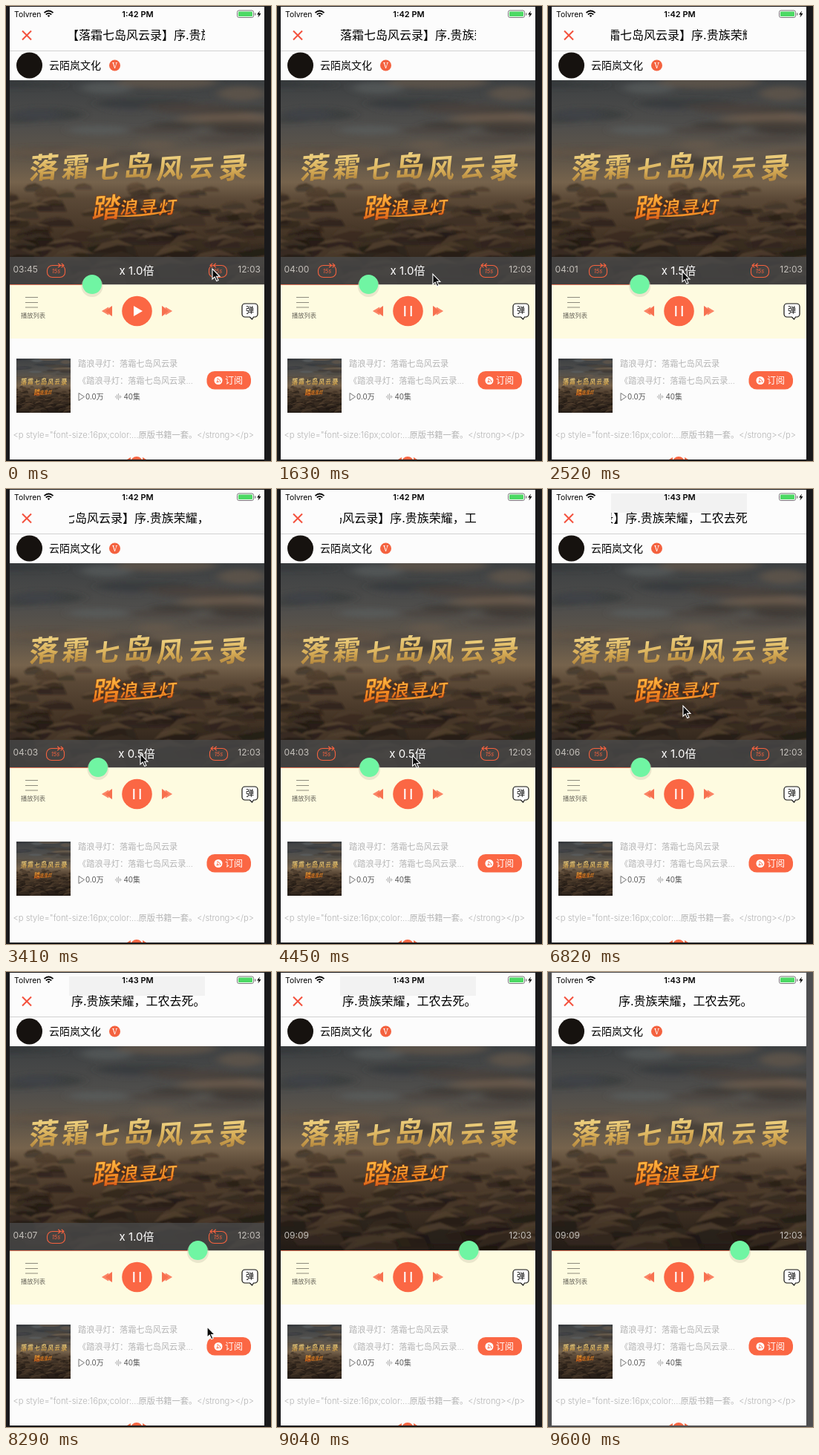
Recreate the animation shown at these times as an HTML page. Size 357 px wide and 613 px high, loop 9700 ms.

```html
<!DOCTYPE html>
<html lang="zh-CN">
<head>
<meta charset="utf-8">
<title>Audio player</title>
<style>
html, body { margin: 0; width: 100%; height: 100%; overflow: hidden; background: #19191b; }
svg { display: block; }
#stage { width: 100%; height: 100%; }
text { font-family: Inter, "Noto Sans CJK SC", "Noto Sans CJK", sans-serif; white-space: pre; }
.mid { text-anchor: middle; }
.end { text-anchor: end; }
.gray { fill: #b4b4b4; font-weight: 300; }
.line { fill: none; stroke: #f4623f; stroke-width: 1.1; stroke-linecap: round; stroke-linejoin: round; }
.tiny { font-size: 7.5px; font-style: italic; fill: #f4623f; text-anchor: middle; }
.brush { font-weight: 600; text-anchor: middle; }
</style>
</head>
<body>
<svg id="stage" viewBox="0 0 357 613" preserveAspectRatio="none">
  <defs>
    <linearGradient id="sky" x2="0" y2="1">
      <stop offset="0" stop-color="#3d4042"/>
      <stop offset=".22" stop-color="#4f4e4c"/>
      <stop offset=".4" stop-color="#625749"/>
      <stop offset=".5" stop-color="#76634c"/>
      <stop offset=".58" stop-color="#5b4937"/>
      <stop offset=".75" stop-color="#453526"/>
      <stop offset="1" stop-color="#211a15"/>
    </linearGradient>
    <linearGradient id="gold" x2="0" y2="1">
      <stop offset="0" stop-color="#f3d98a"/>
      <stop offset=".55" stop-color="#d8ae58"/>
      <stop offset="1" stop-color="#a87a34"/>
    </linearGradient>
    <linearGradient id="fire" x2="0" y2="1">
      <stop offset="0" stop-color="#ffc04a"/>
      <stop offset=".6" stop-color="#f08a22"/>
      <stop offset="1" stop-color="#c8461a"/>
    </linearGradient>
    <filter id="soft" x="-20%" y="-30%" width="140%" height="160%"><feGaussianBlur stdDeviation="7 3"/></filter>
    <filter id="haze"><feGaussianBlur stdDeviation="1"/></filter>
    <clipPath id="artClip"><rect width="343" height="275"/></clipPath>
    <clipPath id="titleClip"><rect x="85" y="28" width="183" height="28"/></clipPath>
    <clipPath id="pageClip"><rect x="5" y="1" width="343" height="610"/></clipPath>
    <g id="art" clip-path="url(#artClip)">
      <rect width="343" height="275" fill="url(#sky)"/>
      <g id="clouds" filter="url(#soft)"></g>
      <g id="rocks" filter="url(#haze)"></g>
      <g id="headline" fill="url(#gold)"></g>
      <g id="subline" fill="url(#fire)" stroke="#7a2c0c" stroke-width=".5"></g>
      <path d="M138 183Q176 182 223 174Q184 187 138 183Z" fill="#f09028"/>
    </g>
    <path id="skip" class="line" d="M-5 -7.500A7 7 0 0 0 -12 -1V2A7 6.500 0 0 0 -5 8.500H5A7 6.500 0 0 0 12 2V-1A7 7 0 0 0 10.500 -5.500M-5 -7.500H10M3 -10L6 -7.500L3 -5M7.500 -10L10.500 -7.500L7.500 -5"/>
    <g id="wing">
      <path d="M0 0L14 -7V7Z" fill="#fcc3b3"/>
      <path d="M0 0L9 -5.500V5.500Z" fill="#fb8465"/>
      <path d="M5 0L14 -7V7Z" fill="#f7714f"/>
    </g>
  </defs>

  <rect id="edge" width="357" height="613"/>
  <rect x="5" y="1" width="343" height="610" fill="#fcfcfc"/>
  <rect id="ghost" x="85" y="6" width="183" height="26" fill="#f2f2f2"/>

  <text x="11" y="15" font-size="10.400">Tolvren</text>
  <g fill="none" stroke="#000" stroke-width="1.800">
    <path d="M51.500 9.200Q57.500 3.800 63.500 9.200M53.800 11.500Q57.500 8.200 61.200 11.500"/>
    <path d="M55.700 13L57.500 15L59.300 13Q57.500 11.600 55.700 13Z" fill="#000" stroke="none"/>
  </g>
  <text id="clock" class="mid" x="177.500" y="15" font-size="11" font-weight="600"></text>
  <rect x="311.500" y="6" width="22" height="9.500" rx="2.300" fill="none" stroke="#777"/>
  <rect x="313" y="7.500" width="19" height="6.500" rx="1" fill="#4cd964"/>
  <path d="M335 9V13Q336.500 12.500 336.500 11T335 9Z" fill="#777"/>
  <path d="M342 6.500L338 11.500H340.500L339.500 15.500L343.500 10H341Z"/>

  <path d="M22 33.500L34 45.500M34 33.500L22 45.500" stroke="#f4503c" stroke-width="2"/>
  <g clip-path="url(#titleClip)"><text id="title" y="45" font-size="16"></text></g>
  <path d="M5 60.500H348" stroke="#d2d2d2"/>

  <circle cx="31.500" cy="80" r="17.500" fill="#16120f"/>
  <text x="58" y="85" font-size="14">云陌岚文化</text>
  <circle cx="146.500" cy="80" r="7.500" fill="#f4623f"/>
  <text class="mid" x="146.500" y="84" font-size="10.500" fill="#fff" style="font-family:'Noto Serif',serif">V</text>

  <use href="#art" x="5" y="100"/>
  <g id="overlay">
    <rect x="5" y="338" width="343" height="37" fill="#494949" fill-opacity=".82"/>
    <g id="back"><use href="#skip"/><text class="tiny" y="3">15s</text></g>
    <g id="ahead"><use href="#skip" transform="scale(-1 1)"/><text class="tiny" y="3">15s</text></g>
    <text id="speed" class="mid" x="176" y="362" font-size="15" fill="#fff"></text>
  </g>
  <g font-size="12" fill="#c4c0bb">
    <text id="time" x="9.500" y="358.500"></text>
    <text class="end" x="343" y="358.500">12:03</text>
  </g>

  <rect x="5" y="375" width="343" height="73" fill="#fefbe0"/>
  <path d="M5 375.500H348" stroke="#d8d3c0"/>
  <path id="played" stroke="#e5765a"/>
  <path d="M26 392.500H43M26 399.500H43M26 406H43" stroke="#8d8b7d" stroke-width="1.100"/>
  <text class="mid" x="36.500" y="420" font-size="8.300" fill="#66645a">播放列表</text>
  <use href="#wing" x="129" y="411"/>
  <use href="#wing" transform="translate(224 411) scale(-1 1)"/>
  <circle cx="176.500" cy="411" r="20.300" fill="#fb6744"/>
  <path id="play" d="M172 404L184 411L172 418Z" fill="#fff"/>
  <path id="pause" d="M172.300 404V418M180.700 404V418" stroke="#fff" stroke-width="2"/>
  <path d="M322 401H335A4 4 0 0 1 339 405V415A4 4 0 0 1 335 419H333.500L331.500 422L328.500 419H322A4 4 0 0 1 318 415V405A4 4 0 0 1 322 401Z" fill="#fff" stroke="#111" stroke-width="1.200"/>
  <text class="mid" x="328.500" y="414" font-size="11">弹</text>

  <use href="#art" transform="translate(14 475) scale(.213 .2655)"/>
  <text class="gray" x="97" y="486" font-size="11.200">踏浪寻灯：落霜七岛风云录</text>
  <text class="gray" x="97" y="508.500" font-size="11.200">《踏浪寻灯：落霜七岛风云录...</text>
  <path d="M98 521.500L105.500 526.500L98 531.500Z" fill="none" stroke="#777"/>
  <text x="107" y="530" font-size="9.800" fill="#555">0.0万</text>
  <path d="M147.500 525.500V527.500M149.500 523.500V529.500M151.500 522V531M153.500 524.500V528.500M155 525.500V527.500" stroke="#b0b0b0"/>
  <text x="158.500" y="530" font-size="9.800" fill="#555">40集</text>
  <rect x="270.500" y="492" width="59.500" height="24.500" rx="10.500" fill="#fb6744"/>
  <circle cx="286" cy="504.500" r="5.500" fill="#fff"/>
  <path d="M284 504.700A2.500 2.500 0 0 1 286.500 507.200M284 502.200A5 5 0 0 1 288.800 507" fill="none" stroke="#fb6744"/>
  <circle cx="284.500" cy="506.500" r=".9" fill="#fb6744"/>
  <text x="295" y="508.500" font-size="12" fill="#fff">订阅</text>
  <text class="gray" x="9.500" y="582" font-size="11.220">&lt;p style="font-size:16px;color:...原版书籍一套。&lt;/strong&gt;&lt;/p&gt;</text>
  <g clip-path="url(#pageClip)" fill="#fb6744">
    <circle cx="176" cy="615" r="8"/>
    <path d="M163 611L168 608V613ZM189 611L184 608V613Z"/>
  </g>

  <g id="thumb">
    <circle cy="2.500" r="14.500" fill="#d5d2b8" fill-opacity=".5"/>
    <circle r="13" fill="#70f5a3"/>
  </g>
  <path id="cursor" d="M0 0V14L3.200 11L5.700 16.500L8 15.500L5.600 10.300H10Z" fill="#0a0a0a" stroke="#fff" stroke-width="1.100"/>
</svg>
<script>
const LOOP = 9700, TICK = 148.1, LAST = 9600;
const NS = 'http://www.w3.org/2000/svg';
const $ = id => document.getElementById(id);

let seed = 11;
const rnd = (a, b) => {
  seed = (seed * 16807) % 2147483647;
  return a + (b - a) * seed / 2147483647;
};
function add(parent, tag, attrs, text) {
  const el = document.createElementNS(NS, tag);
  for (const k in attrs) el.setAttribute(k, attrs[k]);
  if (text) el.textContent = text;
  $(parent).append(el);
}

// Streaky clouds, slate on the left and brown on the right
function paintClouds() {
  const slate = ['#33363a', '#5a5f62', '#44474a'], brown = ['#383430', '#6b5b4b', '#4a423b'];
  for (let i = 0; i < 34; i++) {
    const cx = rnd(0, 343), cy = rnd(0, 122);
    add('clouds', 'ellipse', { cx, cy, rx: rnd(25, 70), ry: rnd(3, 10),
      fill: (cx < 190 && cy < 70 ? slate : brown)[i % 3], 'fill-opacity': .6 });
  }
}

// Rocks grow toward the viewer, each with a lit upper face
function paintRocks() {
  const dark = ['#2a2019', '#352920', '#1f1813'], lit = ['#6a543d', '#564431', '#47382a'];
  for (let i = 0; i < 110; i++) {
    const d = i / 110, x = rnd(-10, 353), y = 142 + 130 * d;
    const w = rnd(8, 16) + 26 * d, h = w * rnd(.25, .45);
    const top = `M${x - w} ${y + h * .3}L${x - w * .6} ${y - h * .6}L${x + w * .1} ${y - h}L${x + w * .8} ${y - h * .3}`;
    add('rocks', 'path', { d: `${top}L${x + w} ${y + h}L${x - w * .8} ${y + h}Z`, fill: dark[i % 3], 'fill-opacity': .4 + .45 * d });
    add('rocks', 'path', { d: `${top}L${x + w * .1} ${y - h * .4}Z`, fill: lit[i % 3], 'fill-opacity': .8 - .4 * d });
  }
}

function paintNames() {
  [...'落霜七岛风云录'].forEach((c, i) => add('headline', 'text', {
    class: 'brush', 'font-size': 39 - (i % 3) * 3,
    transform: `translate(${45 + i * 42.500} ${132 - (i % 2) * 2}) skewX(-10) rotate(-4)` }, c));
  [...'踏浪寻灯'].forEach((c, i) => add('subline', 'text', {
    class: 'brush', 'font-size': i ? 24 : 37,
    transform: `translate(${129 + i * 26 + (i ? 5 : 0)} ${i ? 180 : 185}) skewX(-12) rotate(-4)` }, c));
}

// Linear travel through [time, ...values]
function glide(keys, t) {
  let i = 0;
  while (i < keys.length - 2 && t >= keys[i + 1][0]) i++;
  const a = keys[i], b = keys[i + 1];
  const u = Math.min(1, Math.max(0, (t - a[0]) / (b[0] - a[0])));
  return a.slice(1).map((v, j) => v + (b[j + 1] - v) * u);
}
// Latest value whose time has come
const step = (keys, t) => keys.filter(k => t >= k[0]).pop()[1];

const marquee = [[740, 3], [1630, 16], [3410, 56], [5490, 98], [6820, 125], [7700, 141], [9200, 141], [9600, 134]];
const pointer = [
  [0, 278, 354], [296, 278, 354], [444, 281, 357], [740, 281, 357], [1184, 175, 401], [1332, 177, 402],
  [1630, 210, 361], [1930, 181, 358], [3410, 181, 357], [5330, 184, 361], [5480, 199, 374],
  [5920, 200, 416], [6370, 190, 330], [6812, 182, 292], [7256, 124, 377], [7404, 124, 377],
  [7849, 262, 377], [8145, 264, 380], [8293, 271, 478], [8738, 300, 615]
];
const knob = [[740, 116], [889, 123], [3410, 124], [5480, 125], [7404, 125], [7849, 258.5]];
const speeds = [[0, '1.0'], [2070, '1.5'], [2660, '2.0'], [3250, '0.5'], [4735, '1.0']];
const times = [[0, '03:45'], [880, '04:00'], [2070, '04:01'], [2660, '04:02'], [3105, '04:03'], [4735, '04:04'],
  [5770, '04:05'], [6660, '04:06'], [7540, '04:07'], [8580, '09:09']];

const show = (id, on) => $(id).setAttribute('visibility', on ? 'visible' : 'hidden');
const place = (id, x, y) => $(id).setAttribute('transform', `translate(${x} ${y})`);

function draw(t) {
  const speed = step(speeds, t), spread = speed[0] === '1' ? 0 : 1;
  const [x, y] = glide(pointer, t), [done] = glide(knob, t), late = t >= 4735;
  $('title').setAttribute('x', 85 - glide(marquee, t)[0]);
  $('clock').textContent = late ? '1:43 PM' : '1:42 PM';
  $('time').textContent = step(times, t);
  $('speed').textContent = `x ${speed}倍`;
  $('played').setAttribute('d', `M5 375.5H${done}`);
  place('back', 67.5 - spread, 357);
  place('ahead', 285.5 + spread, 357);
  place('thumb', done, 375);
  place('cursor', x, y);
  show('ghost', late && t < 9325);
  show('play', t < 1180);
  show('pause', t >= 1180);
  show('overlay', t < 8730);
  show('cursor', y < 613);
  $('edge').setAttribute('fill', t >= 9470 ? '#4e4e50' : '#19191b');
}

function loop() {
  const t = performance.now() % LOOP;
  draw(t >= LAST ? LAST : Math.floor((t + 6) / TICK) * TICK);
  requestAnimationFrame(loop);
}

paintClouds();
paintRocks();
paintNames();
$('title').textContent = '【落霜七岛风云录】序.贵族荣耀，工农去死。';
loop();
</script>
</body>
</html>
```
